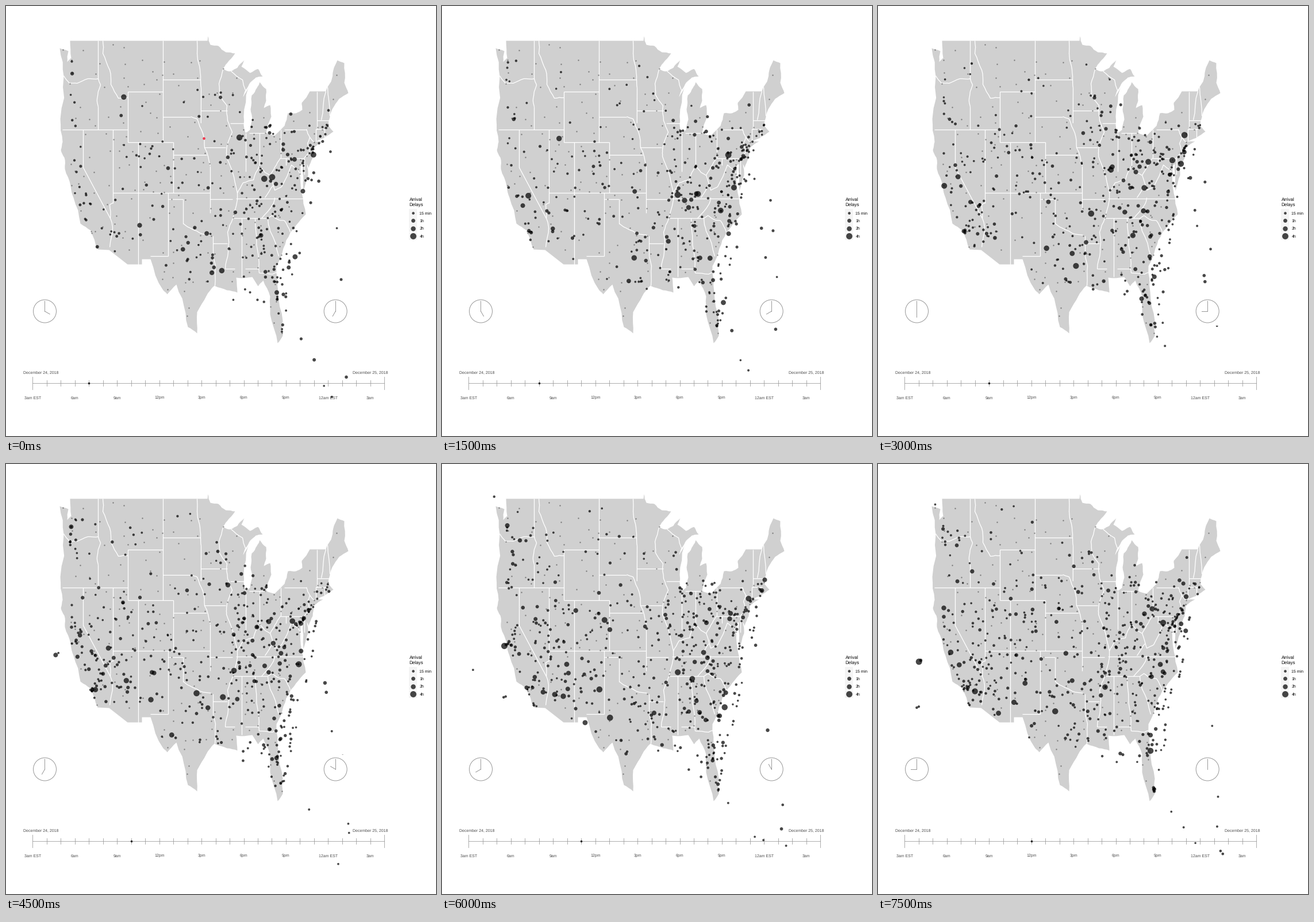
These frames come from a looping animation (748 px wide and 748 px high, 8000 ms). A matplotlib script:

```python
import numpy as np
import matplotlib.pyplot as plt
from matplotlib.animation import FuncAnimation
from matplotlib.collections import LineCollection
from matplotlib.patches import Circle, Polygon, Rectangle
from matplotlib.path import Path

SIZE, DPI, FRAMES, STEP = 748, 100, 16, 500
PT = 72 / DPI
GREY = "#999999"
plt.rcParams["font.family"] = "Liberation Sans"
plt.rcParams["text.hinting"] = "none"
plt.rcParams["text.hinting_factor"] = 1
rng = np.random.RandomState(24)


def geo(lon, lat):
    """Plain longitude and latitude to stage pixels."""
    return 1177.9 + 8.7 * lon, 1140.45 - 22.05 * lat


def meander(points, amount=0.05):
    """Break long pieces of a river or coast into slightly crooked ones."""
    pts = np.array(points, float)
    for _ in range(2):
        step = np.diff(pts, axis=0)
        side = np.c_[-step[:, 1], step[:, 0]]
        mid = pts[:-1] + step / 2 + side * rng.uniform(-amount, amount, (len(step), 1))
        pts = np.insert(pts, np.arange(1, len(pts)), mid, axis=0)
    return pts


# Key points of the coast, clockwise from the north-west
LAKES = [(350, 60), (351, 52), (355, 67), (369, 69), (382, 80), (398, 82), (384, 99),
         (377, 110), (391, 113), (402, 107), (414, 94), (409, 105), (424, 116), (438, 109),
         (446, 122), (434, 124), (424, 133), (416, 146), (412, 158), (421, 142), (413, 192),
         (416, 220), (424, 215), (428, 197), (425, 179), (427, 155), (436, 142), (441, 132),
         (452, 144), (452, 164), (448, 177), (459, 172), (461, 192), (452, 220), (467, 225),
         (484, 208), (490, 186), (504, 186), (515, 180), (514, 168), (528, 148)]
ATLANTIC = [(556, 148), (565, 131), (569, 111), (576, 94), (588, 99), (588, 133), (595, 151),
            (579, 161), (567, 179), (560, 208), (569, 218), (553, 229), (537, 236),
            (551, 235), (535, 246), (533, 264), (526, 281), (523, 274), (525, 294),
            (517, 321), (516, 274), (512, 278), (514, 325), (521, 362), (504, 381),
            (494, 394), (482, 421), (470, 452), (473, 497), (481, 547), (481, 573),
            (472, 586), (459, 536), (459, 505), (447, 477), (438, 487)]
GULF = [(428, 471), (400, 472), (402, 498), (384, 494), (362, 486), (348, 504), (332, 532),
        (332, 569), (316, 558), (312, 534), (296, 484), (280, 501), (273, 494), (251, 440)]
PACIFIC = [(159, 423), (147, 390), (129, 378), (117, 333), (112, 313), (102, 283),
           (101, 263), (95, 250), (98, 236), (94, 196), (100, 122), (93, 73), (108, 78),
           (106, 97), (113, 90), (111, 60)]
CORNER = [(236, 440), (236, 449), (211, 449), (179, 424)]

# State lines that follow a parallel (lat, west, east) or a meridian (lon, north, south)
PARALLELS = [(45.94, -104.05, -96.56), (45, -111.05, -104.05), (43, -104.05, -98.5),
             (43.5, -96.45, -91.2), (42.5, -90.64, -87.8), (42, -124.2, -111.05),
             (42, -79.76, -75.35), (41.73, -86.8, -83.45), (41, -111.05, -102.05),
             (40.6, -95.8, -91.5), (40, -102.05, -95.3), (39.72, -80.52, -75.79),
             (37, -114.05, -94.62), (36.5, -103.04, -100), (36.5, -94.62, -90.2),
             (36.57, -89.5, -75.9), (35, -90.1, -83.1), (33.02, -94.04, -91.15),
             (32, -106.6, -103.04), (31, -91.6, -89.75), (31, -87.6, -85),
             (42.72, -73.3, -70.9), (42.02, -73.5, -71.4)]
MERIDIANS = [(-117.04, 49, 46), (-117.04, 43.8, 42), (-111.05, 45, 41), (-104.05, 49, 41),
             (-102.05, 41, 37), (-120, 42, 39), (-114.05, 42, 36.2), (-109.05, 41, 31.33),
             (-103.04, 37, 32), (-100, 36.5, 34.56), (-94.62, 39.1, 35.4),
             (-94.04, 33.6, 32), (-87.53, 41.7, 38.7), (-84.81, 41.7, 39.1),
             (-80.52, 42, 39.72), (-75.77, 39.72, 38.45), (-79.48, 39.72, 39.2),
             (-88.3, 35, 30.4), (-73.5, 42.05, 41.1), (-73.3, 45, 42), (-71.82, 42.02, 41.3)]
# Lines along rivers and ridges
WEST_RIVERS = [[(100, 121), (110, 134), (123, 134), (142, 126), (160, 126)],
               [(160, 126), (164, 137), (158, 161), (160, 175)],
               [(168, 60), (168, 82), (180, 111), (182, 136), (195, 160), (212, 159)],
               [(186, 342), (180, 345), (181, 369), (185, 384), (180, 419)],
               [(308, 378), (324, 388), (338, 395), (356, 398)],
               [(321, 192), (332, 196), (342, 221), (345, 246), (355, 278)],
               [(332, 60), (336, 104), (338, 127), (339, 142)],
               [(360, 435), (364, 452), (363, 486)]]
EAST_RIVERS = [[(377, 110), (370, 135), (371, 154), (384, 173), (385, 199), (393, 219),
                (383, 250), (383, 261), (393, 287), (402, 325), (394, 369), (385, 393),
                (386, 428), (381, 457)],
               [(391, 113), (411, 128), (416, 146)],
               [(402, 325), (412, 307), (430, 302), (440, 278), (450, 289), (459, 294),
                (467, 280), (477, 264)],
               [(459, 294), (467, 320), (479, 314), (496, 276), (508, 285), (513, 302)],
               [(464, 312), (450, 333)], [(467, 333), (464, 344), (444, 369)],
               [(455, 369), (462, 364), (475, 372), (484, 373), (494, 393)],
               [(455, 369), (459, 391), (474, 435)], [(433, 369), (438, 430), (440, 464)],
               [(440, 464), (463, 466), (470, 463)],
               [(522, 214), (528, 228), (524, 239), (528, 254), (518, 264)],
               [(528, 228), (535, 236)], [(556, 148), (548, 198)], [(559, 141), (563, 191)]]
STRAIGHT = [[(181, 369), geo(-120, 39)], [(339, 142), geo(-96.45, 42.5)]]

# Busy airports: (x, y, traffic)
HUBS = [(114, 94, 6), (111, 135, 5), (114, 312, 9), (120, 287, 5), (148, 392, 10),
        (155, 392, 5), (158, 419, 5), (176, 345, 6), (203, 403, 7), (203, 241, 4),
        (267, 261, 9), (250, 368, 2), (334, 415, 8), (348, 479, 6), (325, 480, 4),
        (367, 151, 4), (413, 215, 9), (392, 286, 4), (354, 274, 3), (393, 479, 4),
        (395, 368, 3), (424, 344, 5), (443, 399, 9), (474, 364, 8), (470, 514, 9),
        (460, 523, 5), (480, 569, 9), (492, 349, 5), (508, 284, 8), (511, 276, 4),
        (523, 261, 5), (535, 244, 13), (560, 206, 5), (453, 210, 4), (466, 227, 3),
        (480, 248, 3), (441, 279, 3), (427, 265, 3)]
NEW_YORK, BOSTON, CAPITAL = (535, 244), (560, 206), (508, 284)
MIAMI, ORLANDO = (480, 569), (470, 514)
LOS_ANGELES, BAY, SEATTLE = (148, 392), (114, 312), (114, 94)

coast = np.vstack([meander(LAKES[1:], 0.07), meander(ATLANTIC, 0.05), meander(GULF, 0.05),
                   CORNER, meander(PACIFIC, 0.05), LAKES[:1]])
borders = ([[geo(a, lat), geo(b, lat)] for lat, a, b in PARALLELS]
           + [[geo(lon, a), geo(lon, b)] for lon, a, b in MERIDIANS]
           + [meander(r) for r in WEST_RIVERS + EAST_RIVERS] + STRAIGHT)


def scatter_towns(n, gap=9):
    """Small airports spread over the land, closer together in the east."""
    land, towns = Path(coast), []
    while len(towns) < n:
        p = rng.uniform((93, 60), (600, 590))
        spread = gap * (1.7 - (p[0] - 93) / 500)
        clear = all(np.hypot(*(p - q)) > spread for q in towns)
        if clear and land.contains_point(p):
            towns.append(p)
    return towns


def miles(a, b):
    return np.hypot((a[..., 0] - b[..., 0]) * 6.4, (a[..., 1] - b[..., 1]) * 3.13)


hubs = np.array(HUBS, float)
spots = np.vstack([hubs[:, :2], scatter_towns(175)])
traffic = np.r_[hubs[:, 2], np.full(len(spots) - len(hubs), 1.2)]


def either_way(a, b):
    return [a, b] if rng.rand() < 0.5 else [b, a]


def domestic(n):
    """Legs between a hub and any airport, short ones more likely."""
    legs = []
    for h in rng.choice(len(hubs), n, p=hubs[:, 2] / hubs[:, 2].sum()):
        d = miles(spots, spots[h])
        p = traffic * np.exp(-d / 480) * (d > 90)
        legs.append(either_way(spots[h], spots[rng.choice(len(spots), p=p / p.sum())]))
    return legs


def between(far, gates, n):
    return [either_way(gates[k % len(gates)], far) for k in range(n)]


legs = np.array(domestic(1950)
                + between(MIAMI, [NEW_YORK, BOSTON, CAPITAL], 45)
                + between(ORLANDO, [NEW_YORK, BOSTON, CAPITAL], 45)
                + between((604, 735), [NEW_YORK, MIAMI, BOSTON, ORLANDO], 22)
                + between((-197, 671), [LOS_ANGELES, BAY, SEATTLE], 22)
                + between((-127, -205), [SEATTLE], 8), float)
count = len(legs)
start = rng.uniform(-14, FRAMES, count)
local = 7 + start / 3 - 3 * (536 - legs[:, 0, 0]) / 423
awake = rng.rand(count) < np.clip((local - 2) / 4, 0.1, 1)
span = 1 + miles(legs[:, 0], legs[:, 1]) / 95
radius = np.clip(1.75 + rng.exponential(0.5, count), 0, 4)
long_delay = rng.rand(count) < 0.035
radius[long_delay] = rng.uniform(3.8, 5.5, long_delay.sum())


def flights(f):
    """Positions and radii of all planes in the air."""
    s = (f - start) / span
    on = awake & (s >= 0) & (s <= 1)
    s, a, step = s[on], legs[on, 0], legs[on, 1] - legs[on, 0]
    x, y = (a + step * s[:, None]).T
    y = y - 16e-4 * s * (1 - s) * step[:, 0] ** 2
    seen = (x > 50) & (x < 603) & (y > 45) & (y < 699)
    return np.c_[x, y][seen], radius[on][seen]


def area(r):
    return (2 * np.asarray(r) * PT) ** 2


fig = plt.figure(figsize=(SIZE / DPI, SIZE / DPI), dpi=DPI, facecolor="white")
ax = fig.add_axes([0, 0, 1, 1])
ax.set(xlim=(-0.5, SIZE - 0.5), ylim=(SIZE - 0.5, -0.5))
ax.axis("off")


def label(x, y, text, px, color="#4d4d4d", ha="center"):
    """Text with its capitals centred on y."""
    ax.text(x, y + 0.36 * px, text, size=px * PT, color=color, ha=ha, va="baseline", zorder=2)


def line(xs, ys, lw=0.8, z=2):
    return ax.plot(xs, ys, color=GREY, lw=lw * PT, zorder=z)[0]


# Map
ax.add_patch(Polygon(coast, fc="#d0d0d0", ec="none"))
ax.add_collection(LineCollection(borders, colors="white", linewidths=1.3 * PT, zorder=1.5))
ax.scatter(*spots.T, s=area(1.2), c="black", alpha=0.4, lw=0, zorder=2)

# Timeline
LEFT, HOUR = 46, 24.47
line([LEFT, LEFT + 25 * HOUR], [656, 656])
for h in range(26):
    tall = 11 if h in (0, 25) else 5
    line([LEFT + h * HOUR] * 2, [656 - tall, 656 + tall])
for h in range(3, 28, 3):
    text = f"{(h - 1) % 12 + 1}{'pm' if 12 <= h < 24 else 'am'}"
    if h in (3, 24):
        text += " EST"
    label(LEFT + (h - 3) * HOUR, 681, text, 6.75)
label(60.7, 636, "December 24, 2018", 6.75)
label(633.2, 636, "December 25, 2018", 6.75)

# Legend
label(701, 335.5, "Arrival", 8.5, "black", "left")
label(701, 345, "Delays", 8.5, "black", "left")
for k, (text, r) in enumerate([("15 min", 2.3), ("1h", 3.4), ("2h", 4.2), ("4h", 5.4)]):
    y = 359.5 + 13.4 * k
    ax.add_patch(Rectangle((701, y - 6.6), 13.2, 13.2, fc="#f4f4f4", ec="none"))
    ax.scatter(707.7, y, s=area(r), c="black", alpha=0.72, lw=0, zorder=3)
    label(719, y, text, 7, "black", "left")

# Clocks: Pacific on the left, Eastern on the right
clocks = []
for cx, hour in ((67, 4), (572.7, 7)):
    cy = 530.5
    ax.add_patch(Rectangle((cx - 25, cy - 25), 50, 50, fc="white", ec="none", zorder=4))
    ax.add_patch(Circle((cx, cy), 20, fc="none", ec=GREY, lw=PT, zorder=5))
    clocks.append((cx, cy, hour, line([], [], 1, 5), line([], [], 1, 5)))

dots = ax.scatter([], [], c="black", alpha=0.72, lw=0, zorder=3)
marker = ax.scatter([], [], s=area(1.8), c="#222222", lw=0, zorder=3)
alert = ax.scatter([344], [229.5], s=area(2.3), c="#f0384f", lw=0, zorder=3.5)


def update(f):
    pos, r = flights(f)
    dots.set_offsets(pos)
    dots.set_sizes(area(r))
    marker.set_offsets([(LEFT + (4 + f / 3) * HOUR, 656)])
    alert.set_visible(f == 0)
    for cx, cy, hour, short, long in clocks:
        for hand, turns, size in ((short, (hour + f / 3) / 12, 10), (long, f / 3, 17.5)):
            a = 2 * np.pi * turns
            hand.set_data([cx, cx + size * np.sin(a)], [cy, cy - size * np.cos(a)])
    return [dots, marker, alert]


anim = FuncAnimation(fig, update, frames=FRAMES, interval=STEP, repeat=True,
                     repeat_delay=0, blit=False)
plt.show()
```
